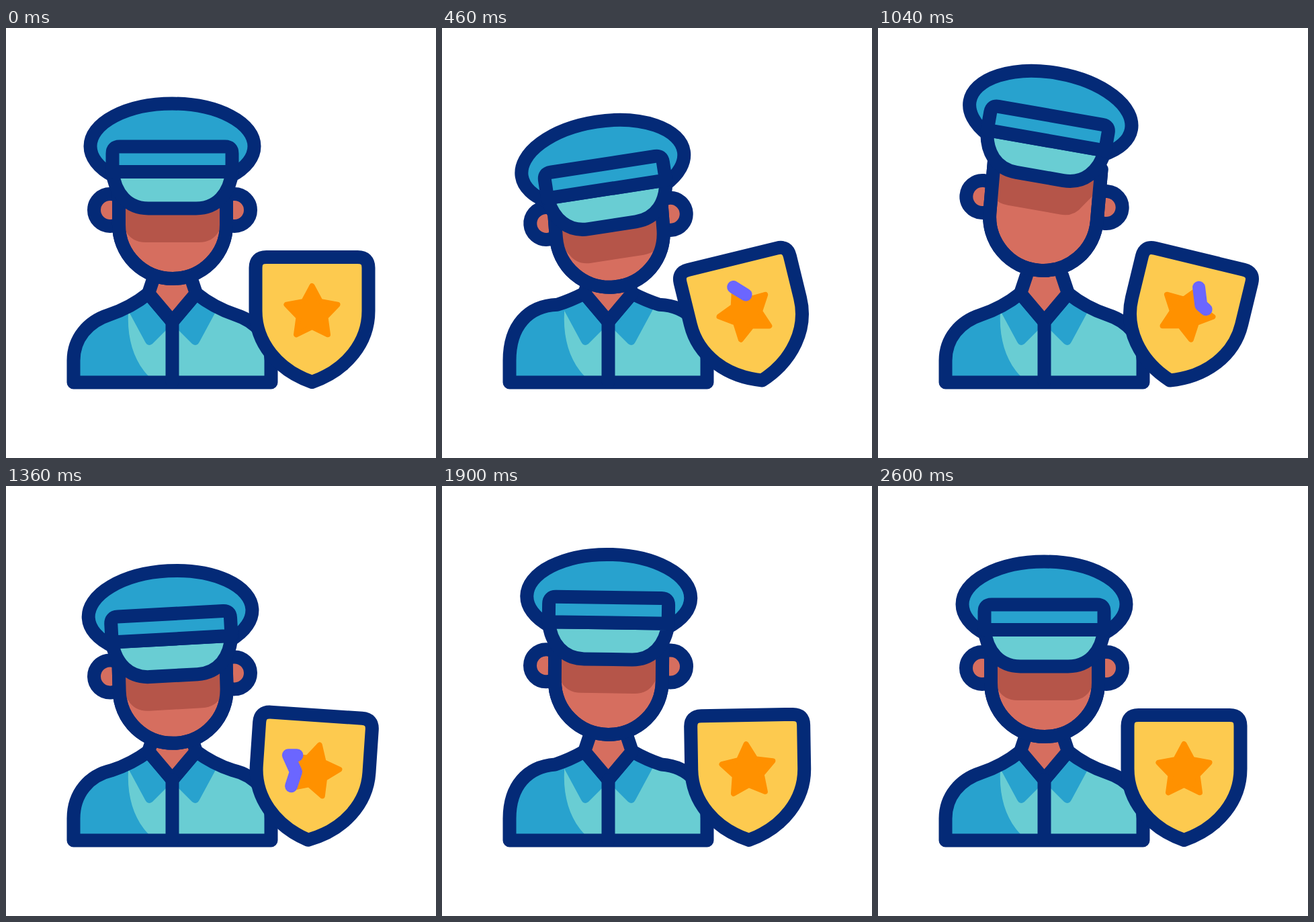
An HTML page for the animation above (3600 ms loop, 640 by 640 pixels).

```html
<!DOCTYPE html>
<html lang="en">
<head>
<meta charset="utf-8">
<title>Officer with badge</title>
<style>
html, body { margin: 0; width: 100%; height: 100%; overflow: hidden; background: #fff; }
svg { display: block; width: 100%; height: 100%; }
.line { stroke: #042a77; stroke-width: 20; stroke-linecap: round; stroke-linejoin: round; }
.none { fill: none; }
.blue { fill: #28a2ce; }
.teal { fill: #69cdd3; }
.skin { fill: #d66e5f; }
.shade { fill: #b55549; }
.gold { fill: #fdca4f; }
#star { fill: #ff9100; stroke: #ff9100; stroke-width: 8; stroke-linejoin: round; }
#glint { fill: none; stroke: #6b66ff; stroke-width: 19; stroke-linecap: round; stroke-linejoin: round; }
</style>
</head>
<body>
<svg viewBox="0 0 640 640">
  <defs>
    <clipPath id="torsoClip"><path class="torso"/></clipPath>
    <clipPath id="faceClip"><path class="head" d="M168 215V293A80 80 0 0 0 328 293V215Z"/></clipPath>
  </defs>

  <path class="torso teal"/>
  <g clip-path="url(#torsoClip)">
    <path class="blue" d="M182 380V425C180 465 192 500 216 522V540H90V380Z"/>
    <path id="collar" class="blue" d="M209 395L173 404L207 467Q211 475 218 470L244 444Z"/>
    <use href="#collar" transform="matrix(-1 0 0 1 495 0)"/>
  </g>
  <path class="torso line none"/>
  <path class="line skin" d="M221 368L212 395L247.5 437L283 395L274 368"/>
  <path class="line none" d="M247.5 437V527"/>

  <g class="head line skin">
    <circle cx="155" cy="271" r="24"/>
    <circle cx="340" cy="271" r="24"/>
    <path d="M168 215V293A80 80 0 0 0 328 293V215"/>
  </g>
  <g clip-path="url(#faceClip)">
    <path class="hat shade" d="M150 215V262L178 302Q187 319 208 319H287Q308 319 317 302L345 262V215Z"/>
  </g>
  <path class="head line none" d="M168 215V293A80 80 0 0 0 328 293V215"/>

  <g class="hat line">
    <ellipse class="blue" cx="247.5" cy="176" rx="122" ry="63.5"/>
    <path class="teal" d="M158.500 214C162 246 181 268.500 212 268.500H283C314 268.500 333 246 336.500 214Z"/>
    <path class="blue" d="M158.500 214V187Q158.500 176.500 169 176.500H326Q336.500 176.500 336.500 187V214Z"/>
  </g>

  <g id="shield">
    <path class="line gold" d="M371.500 357Q371.500 341 387.500 341H523.500Q539.500 341 539.500 357V421C539.500 468 507 509 455.500 527C404 509 371.500 468 371.500 421Z"/>
    <g id="spin">
      <path id="star"/>
      <path id="glint" pathLength="10"/>
    </g>
  </g>
</svg>
<script>
const LOOP = 3600, END = 2600;
const $ = id => document.getElementById(id);
const each = (cls, name, value) =>
  document.querySelectorAll(cls).forEach(el => el.setAttribute(name, value));

// Swings as [time, value] turning points
const headY = [[0, 0], [440, 13], [980, -13], [1460, 12.5], [1980, -4], [2330, 2], [END, 0]];
const hatY = [[0, 0], [440, 26], [980, -50], [1430, 17.5], [2005, -13], [2365, 2], [END, 0]];
const tilt = [[0, 0], [490, -4.4], [1020, 5], [1570, -4.6], [2080, 2.3], [END, 0]];
const sway = [[0, 0], [520, -14.2], [1110, 14.6], [1680, -11.8], [2110, 9], [END, 0]];
const twist = [[0, 0], [510, -12], [1210, 16], [1720, -8.5], [2190, 9], [END, 0]];
const shrug = [[0, 0], [500, 1], [1040, 0], [1200, 0], [1680, 1], [2450, 0], [END, 0]];
const glints = [425, 980];

const clamp = x => Math.min(1, Math.max(0, x));
const mix = (a, b, k) => a + (b - a) * k;

function swing(keys, t) {
  const i = Math.max(1, keys.findIndex(k => k[0] >= t));
  const [t0, a] = keys[i - 1], [t1, b] = keys[i];
  return mix(a, b, (1 - Math.cos(Math.PI * (t - t0) / (t1 - t0))) / 2);
}

function starPath(outer, inner) {
  const pts = Array.from({ length: 10 }, (_, i) => {
    const a = i * Math.PI / 5, r = i % 2 ? inner : outer;
    return [455.5 + r * Math.sin(a), 424 - r * Math.cos(a)].map(n => n.toFixed(2));
  });
  return "M" + pts.join("L") + "Z";
}

// Shoulders go from sloped (0) to raised (1)
function torsoPath(lift) {
  const m = (a, b) => mix(a, b, lift);
  const p = [[100.5, m(462, 443)], [m(122, 128), m(437, 413)], [m(153, 172), m(427, 411.5)],
             [m(186, 190), m(416, 406)], [212, 395]];
  const q = p.map(([x, y]) => [495 - x, y]);
  return `M100.500 527.500V495C${p[0]} ${p[1]} ${p[2]}Q${p[3]} ${p[4]}L247.500 437` +
         `L${q[4]}Q${q[3]} ${q[2]}C${q[1]} ${q[0]} 394.500 495V527.500Z`;
}

$("star").setAttribute("d", starPath(40, 21));
$("glint").setAttribute("d", starPath(43, 25));

function draw(now) {
  const t = Math.min(now % LOOP, END);
  const a = swing(tilt, t);
  each(".head", "transform", `translate(0 ${swing(headY, t)}) rotate(${a} 247.5 271)`);
  each(".hat", "transform", `translate(0 ${swing(hatY, t)}) rotate(${2 * a} 247.5 230)`);
  each(".torso", "d", torsoPath(swing(shrug, t)));
  $("shield").setAttribute("transform", `rotate(${swing(sway, t)} 455.5 438)`);
  $("spin").setAttribute("transform", `rotate(${swing(twist, t)} 455.5 424)`);

  const start = glints.findLast(g => t > g) ?? END;
  const tip = 10 * clamp((t - start) / 450);
  const tail = 10 * clamp((t - start - 60) / 520);
  const glint = $("glint");
  glint.style.display = tip > 0 && tail < 10 ? "" : "none";
  glint.setAttribute("stroke-dasharray", `${tip - tail} 20`);
  glint.setAttribute("stroke-dashoffset", -tail);
}

const begin = performance.now();
function frame() {
  draw(performance.now() - begin);
  requestAnimationFrame(frame);
}
frame();
</script>
</body>
</html>
```
